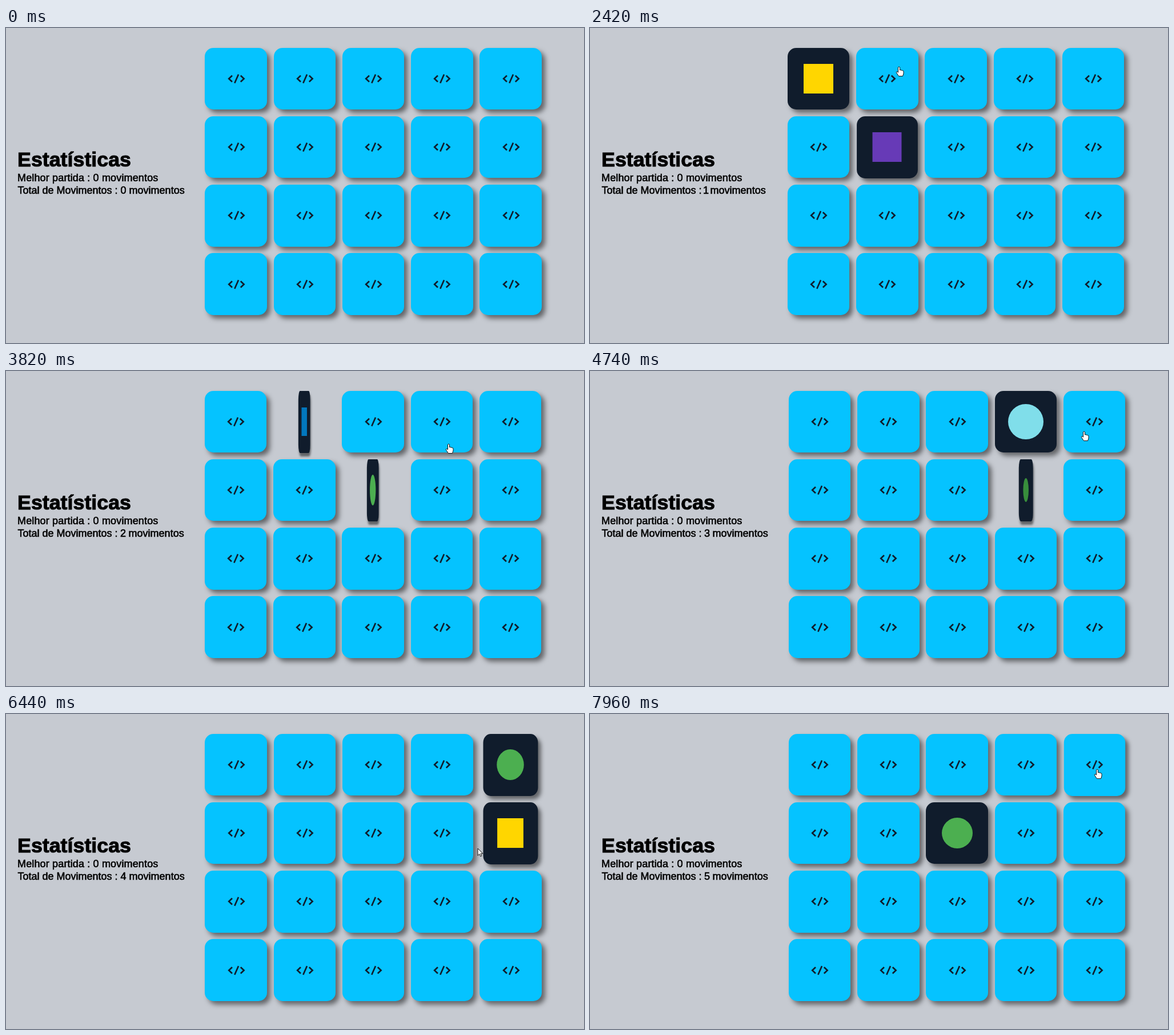
Write an HTML page that moves like this. It is 1012 px wide and 553 px high and loops after 8000 ms.

```html
<!DOCTYPE html>
<html lang="pt">
<head>
<meta charset="utf-8">
<title>Jogo da memória</title>
<style>
  html, body { margin: 0; width: 100%; height: 100%; overflow: hidden; background: #c6cad1; }
  #board { position: absolute; left: 0; top: 34.5px; }
  .card {
    position: absolute; width: 108.5px; height: 108.5px; border-radius: 15px;
    display: flex; align-items: center; justify-content: center;
    background: #05c3ff; box-shadow: 6px 6px 8px rgba(0, 0, 0, .5);
  }
  .card.open { background: #101c2c; }
  .card.open svg, .card:not(.open) i { display: none; }
  .card svg { width: 32px; height: 20px; fill: none; stroke: #101c2c; stroke-width: 2.7; }
  .card i { display: block; }
  #overlay { position: absolute; left: 0; top: 0; }
  text { font-family: "Liberation Sans", Arial, sans-serif; font-size: 18px; stroke: #000; stroke-width: .6px; }
  .title { font-size: 35.8px; font-weight: bold; stroke-width: 1px; }
  #cursor path { fill: #fff; stroke: #111; stroke-width: 1; stroke-linejoin: round; }
</style>
</head>
<body>
<div id="board"></div>
<svg id="overlay" width="1012" height="553" viewBox="0 0 1012 553">
  <text class="title" x="20" y="243">Estatísticas</text>
  <text x="20" y="269" letter-spacing=".15">Melhor partida : 0 movimentos</text>
  <text x="20.5" y="290.5">Total de Movimentos : <tspan id="count">0</tspan><tspan id="unit"> movimentos</tspan></text>
  <g id="cursor">
    <path id="hand" d="M-1.5 1Q0-1 1.5 1V6Q3 4.8 4 6.3Q5.5 5.4 6.3 7Q8 6.5 8 8.5V12L6.5 16.5H-.5L-4.5 10.5Q-5 8.4-3.2 8.6L-1.5 10Z"/>
    <path id="arrow" d="M0 0V12.5L2.9 9.8L4.8 14L6.8 13.1L5 9.1H9Z"/>
  </g>
</svg>
<script>
const LOOP = 8000, SIZE = 108.5, PITCH = 120.25, TOP = 34.5, FLIP = 500;
const $ = id => document.getElementById(id);

const runs = [780, 1640, 2490, 3350, 4210, 5070, 5900, 6740, 7570];

const yellow = { color: '#ffd600', size: 52 };
const purple = { color: '#673ab7', size: 52 };
const blue = { color: '#0277bd', size: 50 };
const green = { color: '#4caf50', size: 54, round: true };
const cyan = { color: '#80deea', size: 62, round: true };
const forest = { color: '#388e3c', size: 42, round: true };

// column, row, face, time opened, time closed
const flips = [
  [0, 0, yellow, 1640, 2565], [1, 1, purple, 2065, 2565],
  [1, 0, blue, 2750, 3680], [2, 1, green, 3180, 3680],
  [3, 0, cyan, 4050, 5083], [3, 1, forest, 4583, 5083],
  [4, 0, green, 5300, 6371], [4, 1, yellow, 5870, 6371],
  [2, 1, green, 7250, Infinity], [4, 0, green, 7920, Infinity]
];
const moves = flips.filter((f, i) => i % 2).map(f => f[3]);
// Digits differ in width, which also recentres the board.
const digitShift = [0, -5, -1, -1, 0, -1];

// time, x, y of the pointer tip
const route = [
  [780, 940, 540], [1319, 435, 140], [1550, 417, 106], [1680, 418, 107],
  [2065, 530, 205], [2410, 541, 68], [2780, 546, 76], [3180, 640, 195],
  [3350, 648, 192], [3812, 775, 128], [4050, 772, 108], [4579, 775, 190],
  [4749, 865, 106], [5070, 867, 105], [5300, 874, 95], [5870, 870, 200],
  [6120, 868, 210], [6439, 826, 236], [6920, 488, 228], [7250, 640, 205],
  [7570, 655, 195], [7955, 888, 97]
];

const board = $('board');
const cards = Array.from({ length: 20 }, (_, i) => {
  const el = document.createElement('div');
  el.className = 'card';
  el.style.left = i % 5 * PITCH + 'px';
  el.style.top = Math.floor(i / 5) * PITCH + 'px';
  el.innerHTML = '<svg viewBox="-16 -10 32 20"><path d="M-7-5.5L-12.8 0L-7 5.5M4-7.5L-2.7 7.8M7.8-5.5L13.6 0L7.8 5.5"/></svg><i></i>';
  return board.appendChild(el);
});

// CSS "ease", cubic-bezier(.25, .1, .25, 1)
function ease(p) {
  if (p <= 0 || p >= 1) return p <= 0 ? 0 : 1;
  const bez = (u, a, b) => 3 * u * (1 - u) * ((1 - u) * a + u * b) + u ** 3;
  let lo = 0, hi = 1;
  for (let i = 0; i < 20; i++) {
    const mid = (lo + hi) / 2;
    if (bez(mid, .25, .25) < p) lo = mid; else hi = mid;
  }
  return bez(lo, .1, 1);
}

function hold(t) {
  const start = runs.filter(s => s <= t).pop();
  return start === undefined ? 0 : start + 77 * Math.min(10, Math.floor((t - start) / 75));
}

function drawCards(t) {
  const turns = cards.map(() => 0);
  for (const [col, row, face, open, close] of flips) {
    if (t < open) continue;
    const i = row * 5 + col;
    turns[i] = ease((t - open) / FLIP) - ease((t - close) / FLIP);
    Object.assign(cards[i].querySelector('i').style, {
      width: face.size + 'px', height: face.size + 'px',
      background: face.color, borderRadius: face.round ? '50%' : '0'
    });
  }
  cards.forEach((el, i) => {
    el.classList.toggle('open', turns[i] > .5);
    const width = Math.abs(Math.cos(turns[i] * Math.PI));
    el.style.transform = width < 1 ? `scaleX(${width})` : '';
  });
}

function drawCursor(t, left) {
  const visible = t >= route[0][0];
  $('cursor').style.display = visible ? '' : 'none';
  if (!visible) return;
  const next = route.findIndex(p => p[0] > t);
  const [a, b] = next < 0 ? route.slice(-2) : [route[next - 1], route[next]];
  const p = Math.min(1, (t - a[0]) / (b[0] - a[0]));
  const s = p * p * (3 - 2 * p);
  const x = a[1] + (b[1] - a[1]) * s, y = a[2] + (b[2] - a[2]) * s;
  const inside = (v, count) => v >= 0 && v < count * PITCH && v % PITCH < SIZE;
  const over = inside(x - left, 5) && inside(y - TOP, 4);
  $('hand').style.display = over ? '' : 'none';
  $('arrow').style.display = over ? 'none' : '';
  $('cursor').setAttribute('transform', `translate(${Math.round(x)} ${Math.round(y)})`);
}

function draw(now) {
  const t = hold(now % LOOP);
  const count = moves.filter(m => m <= t).length;
  const half = digitShift[count] / 2;
  const left = 348.3 + half;
  $('count').textContent = count;
  $('count').setAttribute('dx', half);
  $('unit').setAttribute('dx', half);
  board.style.left = left + 'px';
  drawCards(t);
  drawCursor(t, left);
}

const begin = performance.now();
function tick() {
  draw(performance.now() - begin);
  requestAnimationFrame(tick);
}
tick();
</script>
</body>
</html>
```
